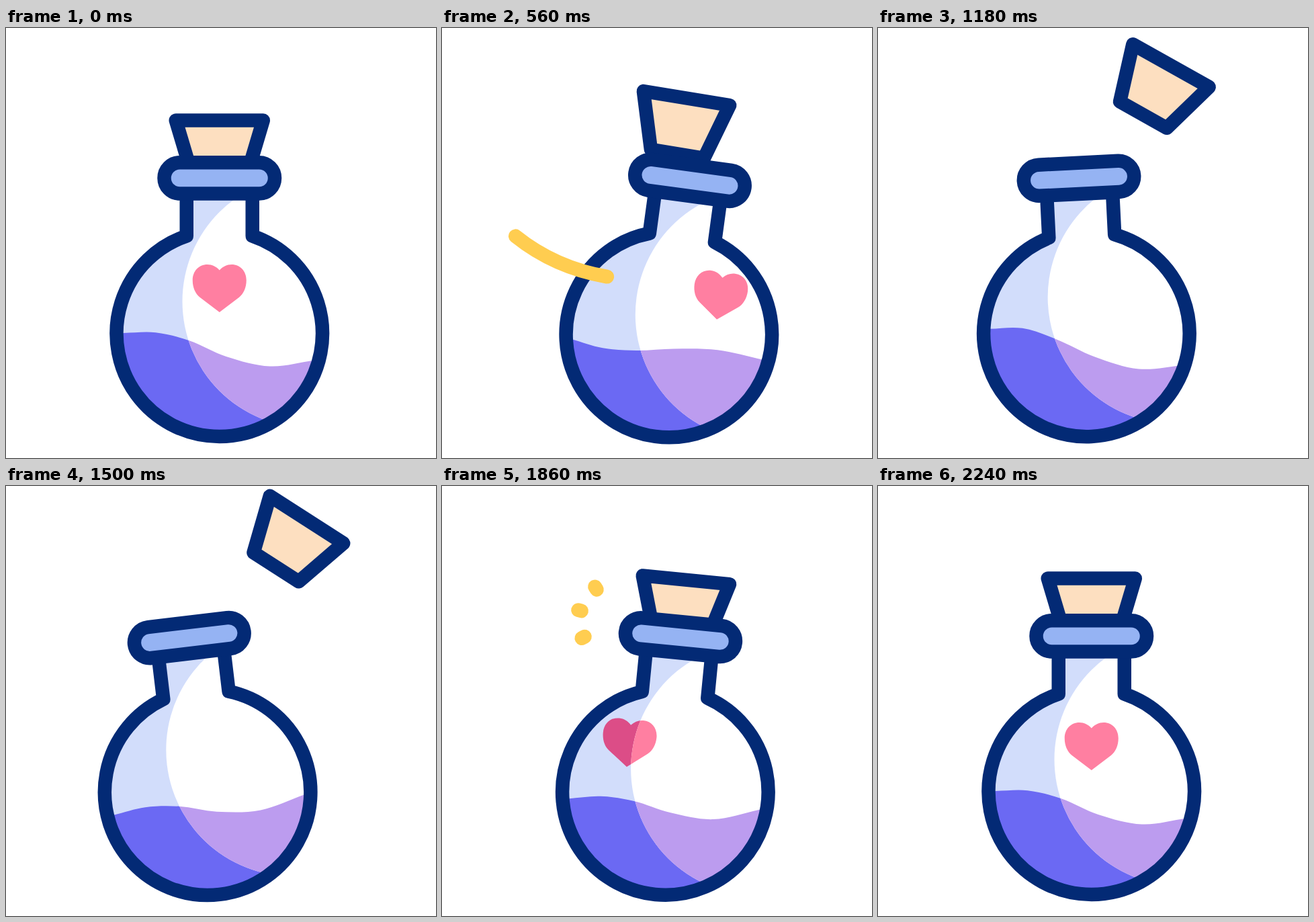
Recreate the animation shown at these times as an HTML page. Size 640 px wide and 640 px high, loop 2.4 s.

```html
<!DOCTYPE html>
<html lang="en">
<head>
<meta charset="utf-8">
<title>Potion</title>
<style>
  html, body { margin: 0; width: 100%; height: 100%; overflow: hidden; background: #fff; }
  svg { display: block; width: 100%; height: 100%; }
  .ink { stroke: #032a75; stroke-width: 20.5; stroke-linejoin: round; stroke-linecap: round; }
  .spark { fill: none; stroke: #ffcd50; stroke-width: 21; stroke-linecap: round; }
</style>
</head>
<body>
<svg viewBox="0 0 640 640">
  <defs>
    <path id="glass" d="M-49-219V-145A153.25 153.25 0 1 0 49-145V-219"/>
    <path id="heart" d="M0-26.5C-5-32-11-35-18-35C-31-35-40-25-40-11.5C-40-1-36 8.5-29 14L0 36L29 14C36 8.5 40-1 40-11.5C40-25 31-35 18-35C11-35 5-32 0-26.5Z"/>
    <clipPath id="inside"><use href="#glass"/></clipPath>
    <clipPath id="lit"><circle cx="132.75" cy="-47.5" r="188"/></clipPath>
  </defs>
  <path id="cork" class="ink" fill="#fddfc0" d="M-65 0H65L40 84H-40Z"/>
  <g id="flask">
    <g clip-path="url(#inside)">
      <rect x="-170" y="-240" width="340" height="420" fill="#d2ddfb"/>
      <path class="liquid" fill="#6b69f3"/>
      <use class="heart" href="#heart" fill="#dc4d87"/>
      <g clip-path="url(#lit)">
        <rect x="-170" y="-240" width="340" height="420" fill="#fff"/>
        <path class="liquid" fill="#bc9cef"/>
        <use class="heart" href="#heart" fill="#ff7fa1"/>
      </g>
    </g>
    <use href="#glass" class="ink" fill="none"/>
    <rect class="ink" x="-82.25" y="-254.25" width="164.5" height="46.25" rx="23.1" fill="#95b3f3"/>
    <g id="rays" class="spark" transform="translate(-98.2 -248)">
      <line transform="rotate(231.8)"/>
      <line transform="rotate(188.5)"/>
      <line transform="rotate(145.8)"/>
    </g>
  </g>
  <path id="swoosh" class="spark" pathLength="1" d="M100 302Q184 375 306.5 375"/>
</svg>
<script>
const LOOP = 2400, STEP = 20;
const CENTER = { x: 317.75, y: 454.5 }, PIVOT = 149.5, CORK_REACH = 466.5;
const $ = id => document.getElementById(id);
const all = sel => document.querySelectorAll(sel);
const rays = all('#rays line');

const lerp = (a, b, p) => a + (b - a) * p;
const ease = (from, to, t) => {
  const p = Math.min(1, Math.max(0, (t - from) / (to - from)));
  return (1 - Math.cos(Math.PI * p)) / 2;
};

// Slopes of a smooth curve through points; flat ends come to rest.
function slopes(xs, ys, flat) {
  const last = xs.length - 1;
  return xs.map((_, i) => {
    if (flat && (i === 0 || i === last)) return 0;
    const a = Math.max(0, i - 1), b = Math.min(last, i + 1);
    return (ys[b] - ys[a]) / (xs[b] - xs[a]);
  });
}

function track(times, values) {
  const m = slopes(times, values, true), last = times.length - 1;
  return t => {
    if (t <= times[0]) return values[0];
    if (t >= times[last]) return values[last];
    const i = times.findIndex(x => x > t) - 1;
    const h = times[i + 1] - times[i], p = (t - times[i]) / h, q = 1 - p;
    return values[i] * q * q * (1 + 2 * p) + values[i + 1] * p * p * (3 - 2 * p)
      + h * p * q * (m[i] * q - m[i + 1] * p);
  };
}

const swing = [[210, 0], [800, 12], [1405, -9.3], [1765, 6.2], [2240, 0]];
function tilt(t) {
  return swing.slice(1).reduce((a, [time, angle], i) =>
    t > swing[i][0] ? lerp(swing[i][1], angle, ease(swing[i][0], time, t)) : a, 0);
}

const flight = [210, 560, 860, 1180, 1500];
const corkTracks = [
  [317.75, 364, 417, 436, 447.5],
  [137.5, 104.5, 69, 56, 50],
  [0, 9.3, 21, 29.3, 32.7]
].map(values => track(flight, values));

// Surface heights at a few places across the flask, as it sloshes.
const surfaceX = [-143, -95, -45, 10, 75, 142];
const sloshTimes = [210, 560, 860, 1180, 1500, 1860, 2240];
const calm = [-0.5, -1.2, 10.7, 34.5, 49, 40];
const slosh = [
  calm,
  [26.6, 33.5, 30.5, 20.5, 13.5, 18.7],
  [20.9, 31, 28, 20, 14.8, 23.8],
  [-14, -12.5, 6.5, 35, 56.5, 54],
  [17.5, 11.5, 16, 30.5, 36, 20.9],
  [24.3, 16, 18.2, 30, 33.7, 12.7],
  calm
];
const surface = surfaceX.map((_, i) => track(sloshTimes, slosh.map(row => row[i])));

function liquidPath(t) {
  const ys = surface.map(f => f(t)), m = slopes(surfaceX, ys, false);
  let d = `M-170 170V${ys[0]}H${surfaceX[0]}`;
  for (let i = 1; i < ys.length; i++) {
    const a = surfaceX[i - 1], b = surfaceX[i], h = (b - a) / 3;
    d += `C${a + h} ${ys[i - 1] + h * m[i - 1]} ${b - h} ${ys[i] - h * m[i]} ${b} ${ys[i]}`;
  }
  return d + 'H170V170Z';
}

function corkPose(t, angle) {
  const rad = angle * Math.PI / 180;
  const seated = [
    CENTER.x + CORK_REACH * Math.sin(rad),
    CENTER.y + PIVOT - CORK_REACH * Math.cos(rad),
    angle
  ];
  const fall = ease(1520, 1810, t);
  return corkTracks.map((f, i) => lerp(f(t), seated[i], fall));
}

function draw(t) {
  const angle = tilt(t);
  $('flask').setAttribute('transform',
    `translate(${CENTER.x} ${CENTER.y}) rotate(${angle} 0 ${PIVOT})`);

  const [x, y, turn] = corkPose(t, angle);
  $('cork').setAttribute('transform', `translate(${x} ${y}) rotate(${turn})`);

  const d = liquidPath(t);
  all('.liquid').forEach(el => el.setAttribute('d', d));

  const heartX = t < 1200 ? 180 * ease(220, 1030, t) : -180 + 180 * ease(1400, 2160, t);
  all('.heart').forEach(el => el.setAttribute('transform', `translate(${heartX} -67.5)`));

  const tail = ease(500, 900, t), head = ease(300, 700, t);
  $('swoosh').style.display = head > tail ? '' : 'none';
  $('swoosh').setAttribute('stroke-dasharray', `${head - tail} 3`);
  $('swoosh').setAttribute('stroke-dashoffset', -tail);

  const inner = lerp(53, 87, ease(1920, 2160, t)), outer = lerp(53, 87, ease(1810, 2010, t));
  $('rays').style.display = outer > inner ? '' : 'none';
  rays.forEach(ray => {
    ray.setAttribute('x1', inner);
    ray.setAttribute('x2', outer);
  });
}

const start = performance.now();
function tick() {
  const t = (performance.now() - start) % LOOP;
  draw(Math.floor(t / STEP) * STEP);
  requestAnimationFrame(tick);
}
tick();
</script>
</body>
</html>
```
